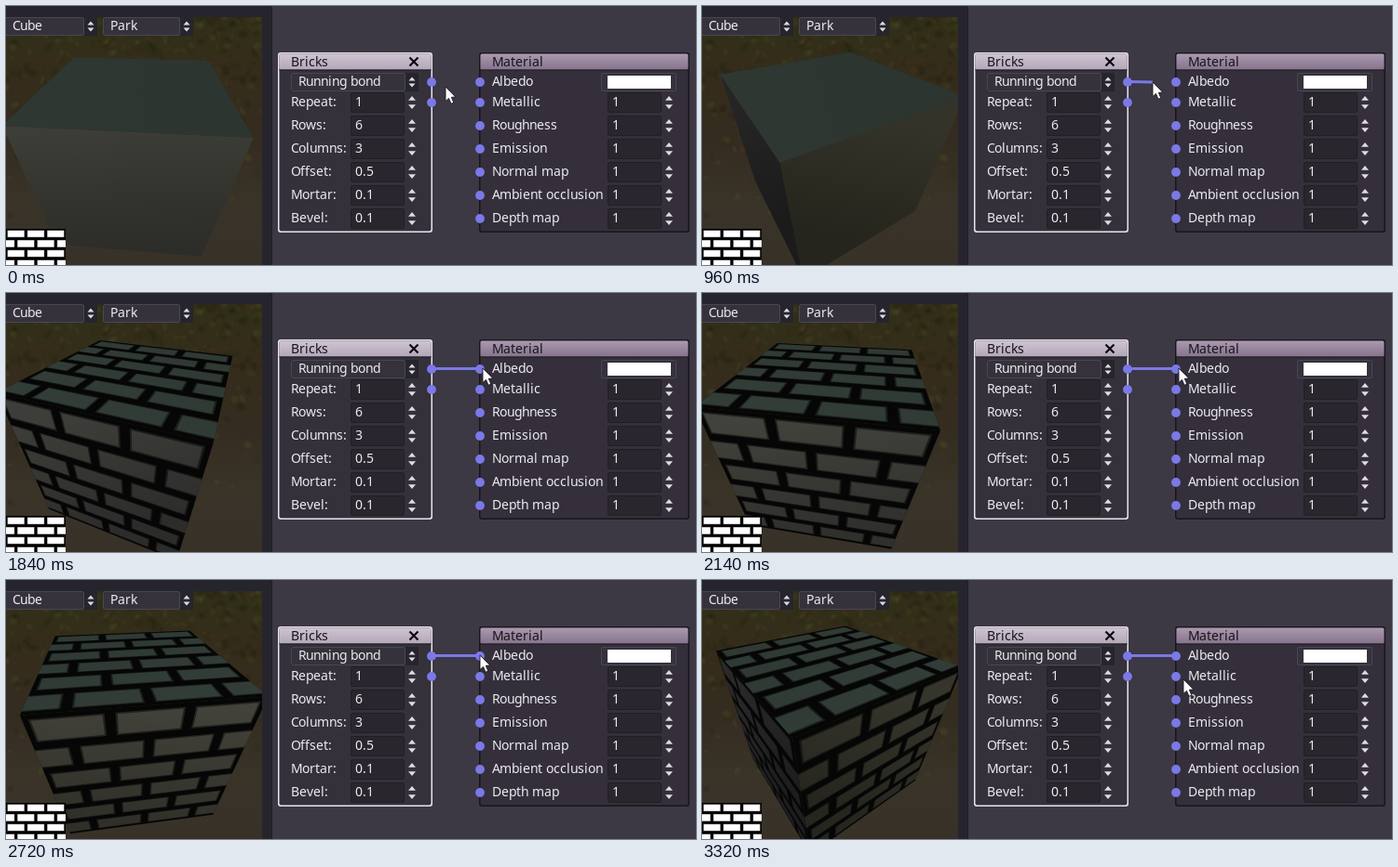
These frames come from a looping animation (741 by 279 pixels, 3.4 s). An HTML page with a canvas:

```html
<!DOCTYPE html>
<html lang="en">
<head>
<meta charset="utf-8">
<title>Node editor</title>
<style>
  html, body { margin: 0; width: 100%; height: 100%; overflow: hidden; background: #3c3844; }
  #stage { position: relative; width: 741px; height: 279px; overflow: hidden; }
  canvas, svg { position: absolute; left: 0; top: 0; display: block; }
  text { font: 14px "Noto Sans", "Open Sans", sans-serif; fill: #ebeaee; white-space: pre; }
  text.title { fill: #17141b; }
  .btn { fill: #35323c; stroke: #4a4652; }
  .field { fill: #29262e; stroke: #211f26; }
  .arrow { fill: #dddce1; }
  .port { fill: #7b79e8; }
</style>
</head>
<body>
<div id="stage">
  <canvas id="view" width="275" height="279"></canvas>
  <svg id="ui" width="741" height="279" viewBox="0 0 741 279">
    <defs>
      <linearGradient id="barOn" x2="0" y2="1">
        <stop offset="0" stop-color="#cfc4d2"/><stop offset="1" stop-color="#b3a7b8"/>
      </linearGradient>
      <linearGradient id="barOff" x2="0" y2="1">
        <stop offset="0" stop-color="#ab99b0"/><stop offset="1" stop-color="#86748d"/>
      </linearGradient>
    </defs>
    <g id="panels"></g>
    <line id="wire" x1="457" y1="81.5" stroke-width="3"/>
    <g id="labels"></g>
    <path id="cursor" d="M0 0V15.5L3.5 12.4L6 18.3L8.8 17.1L6.3 11.3L10.8 11Z" fill="#fff" stroke="#1b1920" stroke-width=".9"/>
  </svg>
</div>
<script>
const $ = id => document.getElementById(id);
const LOOP = 3400, STEP = 73.75, TICK = 20;

// ---------- interface ----------
const meter = document.createElement('canvas').getContext('2d');
meter.font = '14px "Noto Sans", "Open Sans", sans-serif';

// Glyph advances are snapped to whole pixels, as in a hinted interface font.
function text(x, y, str, cls = '') {
  const xs = [];
  for (const ch of str) {
    xs.push(x);
    const w = meter.measureText(ch).width;
    x += w < 8 ? Math.round(w) : Math.floor(w);
  }
  return `<text class="${cls}" x="${xs.join(' ')}" y="${y}">${str}</text>`;
}
const rect = (x, y, w, h, attrs) => `<rect x="${x}" y="${y}" width="${w}" height="${h}" ${attrs}/>`;
const box = (x, y, w, h, cls) => rect(x + .5, y + .5, w - 1, h - 1, `rx="1.5" class="${cls}"`);
const port = (x, y) => `<circle class="port" cx="${x}" cy="${y}" r="4.9"/>`;
const arrows = (x, y, w, gap, h) =>
  `<path class="arrow" d="M${x - w} ${y - gap}h${2 * w}l${-w} ${-h}zM${x - w} ${y + gap}h${2 * w}l${-w} ${h}z"/>`;
const spin = (x, y, value) =>
  box(x, y - 11, 58, 22, 'field') + text(x + 5, y + 4, value) + arrows(x + 66, y, 4, 2.2, 4.8);
const option = (x, y, w, label) =>
  rect(x, y, w, 20, 'fill="#26242d"') + box(x, y, w - 14, 20, 'btn') +
  text(x + 8, y + 14, label) + arrows(x + w - 7, y + 10, 3.5, 1.5, 4);
const node = (x, w, bar, edge, body) =>
  rect(x, 50, w, 194, `rx="3" fill="${edge}"`) +
  rect(x + 1.5, 51.5, w - 3, 191, `rx="2" fill="${body}"`) +
  rect(x + 1.5, 51.5, w - 3, 17, `rx="1.5" fill="url(#${bar})"`) +
  rect(x + 1.5, 68.5, w - 3, 1, 'fill="#211e26"');

const rowY = i => i ? 79 + 25 * i : 82;
const brickRows = [['Repeat:', '1'], ['Rows:', '6'], ['Columns:', '3'], ['Offset:', '0.5'], ['Mortar:', '0.1'], ['Bevel:', '0.1']];
const slots = ['Albedo', 'Metallic', 'Roughness', 'Emission', 'Normal map', 'Ambient occlusion', 'Depth map'];

$('panels').innerHTML =
  rect(0, 0, 286, 12, 'fill="#26242d"') + rect(275, 0, 11, 279, 'fill="#26242d"') +
  rect(285, 0, 1, 279, 'fill="#201e26"') +
  option(-1, 12, 99, 'Cube') + option(104, 12, 97, 'Park') +
  node(292, 166, 'barOn', '#e9e5ec', '#35313b') +
  node(508, 226, 'barOff', '#18161b', '#352f3b');

$('labels').innerHTML =
  text(306, 65, 'Bricks', 'title') + text(522, 65, 'Material', 'title') +
  '<path d="M433.5 55.5l9 9m0-9l-9 9" stroke="#0d0b10" stroke-width="2.2"/>' +
  option(306, 72, 137, 'Running bond') +
  brickRows.map(([name, value], i) => text(306, rowY(i + 1) + 4, name) + spin(370, rowY(i + 1), value)).join('') +
  port(457, 82) + port(457, 104) +
  box(639, 72, 81, 20, 'btn') + rect(646, 75, 68, 14, 'fill="#fff"') +
  slots.map((name, i) => port(509, rowY(i)) + text(522, rowY(i) + 4, name) + (i ? spin(646, rowY(i), '1') : '')).join('');

// ---------- preview ----------
const ctx = $('view').getContext('2d');

function backdrop() {
  const c = document.createElement('canvas');
  c.width = 275; c.height = 279;
  const g = c.getContext('2d');
  const sky = g.createLinearGradient(0, 12, 0, 279);
  [[0, '#303018'], [.25, '#352c1b'], [.5, '#342c20'], [.75, '#3a3328'], [1, '#383128']]
    .forEach(([at, col]) => sky.addColorStop(at, col));
  g.fillStyle = sky;
  g.fillRect(0, 0, 275, 279);
  let seed = 7;
  const rnd = () => (seed = seed * 16807 % 2147483647) / 2147483647;
  g.filter = 'blur(1px)';
  for (let i = 0; i < 420; i++) {
    const x = rnd() * 275, y = 12 + rnd() * rnd() * 230;
    const hue = 30 + rnd() * 55 - x * .06;
    g.fillStyle = `hsla(${hue},38%,${7 + rnd() * 19}%,.36)`;
    g.beginPath();
    g.ellipse(x, y, 1.5 + rnd() * 4.5, 1 + rnd() * 3, rnd() * 3, 0, 7);
    g.fill();
  }
  return c;
}
const park = backdrop();

const HEIGHT = 1.9;
const CAM = { f: 232, d: 2.457, top: -.96, sin: .67, cos: .75, x: 137.5, y: 175 };
function project(x, near, down) {
  const k = CAM.f / (CAM.d - near * CAM.cos + down * CAM.sin);
  return [CAM.x + k * x, CAM.y + k * (CAM.top + near * CAM.sin + down * CAM.cos)];
}
const turn = (x, near, a) => [x * Math.cos(a) + near * Math.sin(a), near * Math.cos(a) - x * Math.sin(a)];

function quad(g, at, u0, v0, u1, v1) {
  g.moveTo(...at(u0, v0));
  g.lineTo(...at(u1, v0));
  g.lineTo(...at(u1, v1));
  g.lineTo(...at(u0, v1));
  g.closePath();
}

// Running bond, 6 rows by 3 columns, in the unit square.
function bricks(g, at, inset) {
  g.beginPath();
  for (let r = 0; r < 6; r++) {
    for (let c = 0; c < 3 + r % 2; c++) {
      const u = (c - r % 2 / 2) / 3;
      quad(g, at, Math.max(0, u + inset), r / 6 + inset, Math.min(1, u + 1 / 3 - inset), (r + 1) / 6 - inset);
    }
  }
  g.fill();
}
function brickLayers(g, at) {
  g.globalAlpha = .45;
  bricks(g, at, .022);
  g.globalAlpha = 1;
  bricks(g, at, .03);
}

const rgb = (c, k) => `rgb(${c.map(v => Math.round(v * k)).join()})`;

function face(at, color, fade, textured) {
  const a = at(.5, 0), b = at(.5, 1);
  const shade = ctx.createLinearGradient(...a, ...b);
  const gain = textured ? 1.1 : 1;
  shade.addColorStop(0, rgb(color, gain));
  shade.addColorStop(1, rgb(color, gain * fade));
  ctx.fillStyle = textured ? '#050605' : shade;
  ctx.beginPath();
  quad(ctx, at, 0, 0, 1, 1);
  ctx.fill();
  if (textured) {
    ctx.fillStyle = shade;
    brickLayers(ctx, at);
  }
}

function cube(angle, textured) {
  for (let side = 0; side < 4; side++) {
    const a = angle - side * Math.PI / 2;
    const at = (u, v) => project(...turn(2 * u - 1, 1, a), HEIGHT * v);
    const [p, q, r] = [at(0, 0), at(1, 0), at(0, 1)];
    if ((q[0] - p[0]) * (r[1] - p[1]) <= (q[1] - p[1]) * (r[0] - p[0])) continue;
    const facing = Math.atan2(Math.sin(a), Math.cos(a));
    const lum = 37 + 24 * Math.max(0, Math.cos(1.75 * facing));
    const warm = Math.sin(facing);
    face(at, [lum, lum, lum * (.89 - .16 * warm)], .72, textured);
  }
  const top = (u, v) => project(...turn(2 * u - 1, 2 * v - 1, angle - Math.PI / 2), 0);
  face(top, [44, 53, 48], 1.04, textured);
}

function thumbnail() {
  ctx.fillStyle = '#000';
  ctx.fillRect(0, 240, 64, 39);
  ctx.fillStyle = '#fff';
  brickLayers(ctx, (u, v) => [64 * u, 240 + 64 * v]);
}

// ---------- motion, keyed by step ----------
const angleKeys = [[0, -5], [8, 17], [19, 48.8], [29, 80], [34, 91], [37, 98], [45, 125]];
const cursorKeys = [[0, 472, 87], [2, 471, 87], [7, 458, 82], [10, 458, 82], [16, 510, 81], [17, 512, 81],
  [32, 512, 81], [33, 509, 81], [41, 509, 81], [45, 517, 107]];
const GRAB = 10, SNAP = 16, DROP = 22;

function sample(keys, n) {
  let i = 1;
  while (i < keys.length - 1 && keys[i][0] < n) i++;
  const a = keys[i - 1], b = keys[i];
  const k = Math.min(1, (n - a[0]) / (b[0] - a[0]));
  return a.slice(1).map((v, j) => v + (b[j + 1] - v) * k);
}

function draw(time) {
  const n = Math.ceil((Math.floor(time / TICK) + .51) * TICK / STEP) - 1;
  const [x, y] = sample(cursorKeys, n).map(Math.round);
  const [deg] = sample(angleKeys, n);

  ctx.drawImage(park, 0, 0);
  cube(deg * Math.PI / 180, n >= DROP);
  thumbnail();

  const wire = $('wire');
  wire.style.display = n > GRAB ? '' : 'none';
  wire.setAttribute('x2', n >= SNAP ? 509 : x);
  wire.setAttribute('y2', n >= SNAP ? 81.5 : y);
  wire.setAttribute('stroke', n >= SNAP && n < DROP ? '#dddaf6' : '#7b79e8');
  $('cursor').setAttribute('transform', `translate(${x} ${y})`);
}

const start = performance.now();
function frame() {
  draw((performance.now() - start) % LOOP);
  requestAnimationFrame(frame);
}
frame();
</script>
</body>
</html>
```
